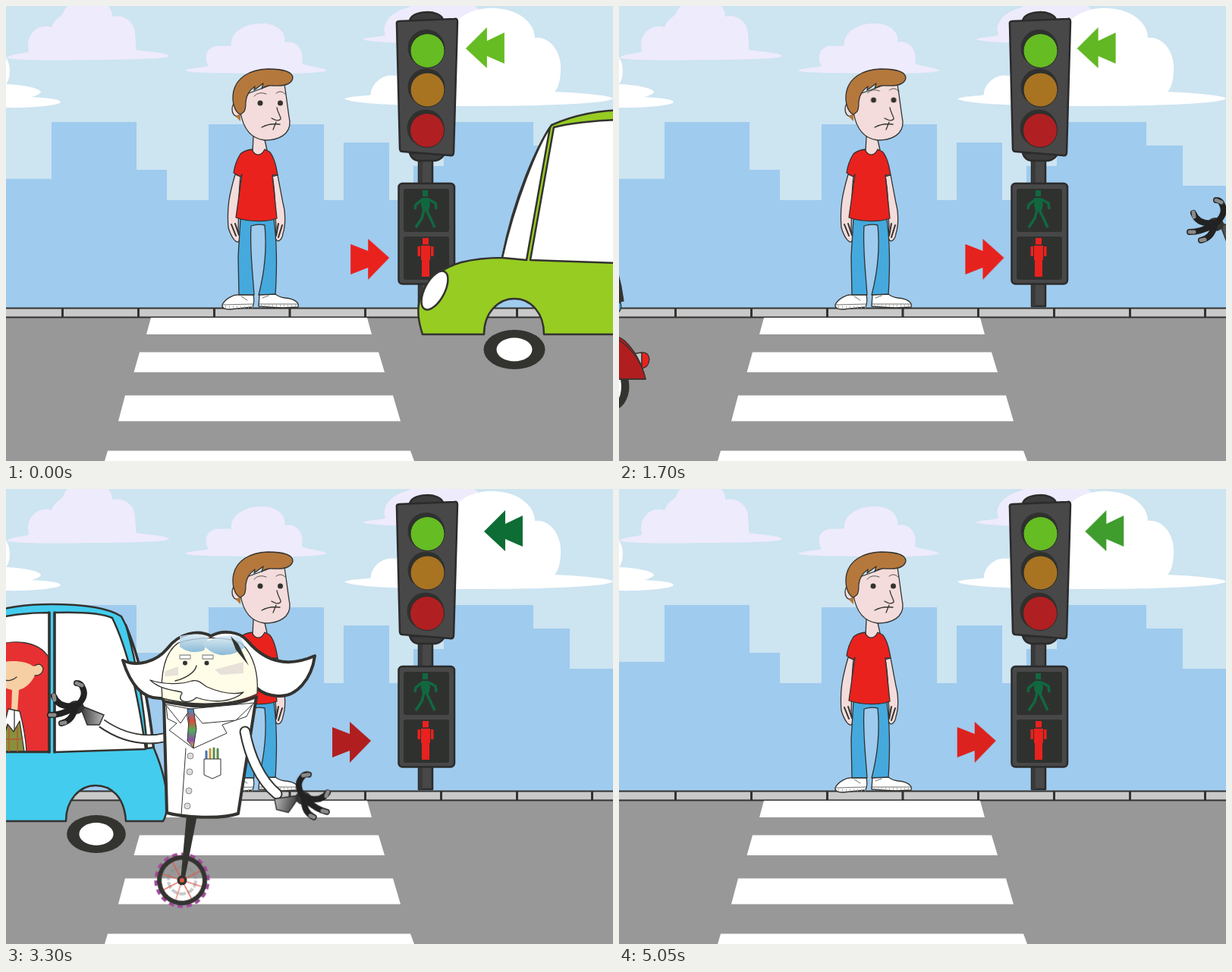
Animation of 800x600 px, one loop 5100 ms. Source, as an HTML page:

```html
<!DOCTYPE html>
<html lang="en">
<head>
<meta charset="utf-8">
<title>Waiting at the crossing</title>
<style>
html, body { margin: 0; width: 100%; height: 100%; overflow: hidden; background: #cde4f1; }
svg { display: block; width: 800px; height: 600px; }
.ink { stroke: #333330; stroke-width: 2.5; stroke-linejoin: round; }
.thin { stroke-width: 1.3; }
.bold { stroke-width: 4; }
.line { fill: none; stroke-linecap: round; }
.white { fill: #fff; }
.dark { fill: #333330; }
.skin { fill: #f3dcdb; }
.red { fill: #e9221e; }

/* --at: time in ms at which the part stands as drawn, --v: px per ms */
.pass { animation: pass 5100ms steps(102) infinite; }
@keyframes pass {
  from { transform: translateX(calc(var(--at) * var(--v) * 1px)); }
  to { transform: translateX(calc((var(--at) - 5100) * var(--v) * 1px)); }
}
.spin { animation: spin 5100ms steps(102) infinite; }
@keyframes spin { to { transform: rotate(-3728deg); } }

.eyes { animation: glance 5100ms linear infinite; }
@keyframes glance {
  0%, 23%, 60%, 100% { transform: none; }
  30%, 52% { transform: translate(.5px, -4px); }
}

.arrow { animation: nudge 5100ms linear infinite; }
@keyframes nudge {
  0% { transform: translateX(calc(var(--d) * 3.8px)); fill: var(--a); }
  15.84%, 32.9%, 49.2%, 59.5%, 72%, 87.1% { transform: translateX(0); fill: var(--a); }
  7.41%, 24.27%, 41.14%, 54.53%, 64.45%, 79.8%, 94.65% { transform: translateX(calc(var(--d) * 29px)); fill: var(--b); }
  100% { transform: translateX(calc(var(--d) * 8.6px)); fill: var(--m); }
}
</style>
</head>
<body>
<svg viewBox="0 0 800 600">
<defs>
  <linearGradient id="lens" x2="0" y2="1">
    <stop stop-color="#d5eaf6"/><stop offset="1" stop-color="#6fa9d4"/>
  </linearGradient>
  <linearGradient id="cuff"><stop stop-color="#333"/><stop offset="1" stop-color="#bbb"/></linearGradient>
  <linearGradient id="tie" x2="0" y2="1">
    <stop stop-color="#3a8fd0"/><stop offset=".3" stop-color="#e2483a"/>
    <stop offset=".55" stop-color="#4fae58"/><stop offset=".8" stop-color="#8c4fa8"/><stop offset="1" stop-color="#e0b53a"/>
  </linearGradient>
  <g id="wheel">
    <ellipse class="dark" rx="40.5" ry="26"/><ellipse class="white" rx="23.5" ry="15.5"/>
  </g>
  <g id="tall">
    <ellipse class="dark" rx="22.5" ry="31"/><ellipse class="white" rx="12" ry="23"/>
  </g>
  <g id="hand" class="line" stroke-width="8">
    <path d="M-34-17L-2-4-8 9-24 9Z" fill="url(#cuff)" stroke="#333" stroke-width="1.5"/>
    <ellipse class="dark" cx="-39" cy="-14" rx="11" ry="9"/>
    <path stroke="#222" d="M-38-16Q-24-28-30-40Q-32-46-38-46M-40-16Q-62-13-68-29M-42-13Q-58-4-73-4M-40-12Q-44 4-58 7"/>
    <path d="M-31-43L-38-46M-67-24L-68-30M-67-4L-73-4M-53 6L-58 7" stroke="#8a8a8a" stroke-width="5"/>
  </g>
  <g id="sedan">
    <path class="ink red" d="M-110 600C-75 555-35 505-12 478C5 467 20 464 40 462C100 457 160 456 200 457C280 458 350 462 385 468C415 482 455 550 478 600Z"/>
    <path class="ink white" d="M-12 484C-50 522-82 570-98 600H-72C-58 565-35 515-12 484Z
      M10 473C60 468 130 466 184 465L182 600H-58C-45 560-15 500 10 473Z
      M201 466C265 466 325 468 367 471C395 495 425 560 435 600H197Z
      M398 480C430 505 460 560 475 600H452C445 565 425 515 398 480Z"/>
    <path class="dark" d="M197 465H202L201 600H196ZM182 465H185L183 600H180Z"/>
  </g>
</defs>

<!-- town -->
<path fill="#cde4f1" d="M0 0H800V600H0Z"/>
<g fill="#eeebfc">
  <path d="M0 68C10 62 25 63 30 60C25 40 40 22 60 28C65 15 72 15 75 10C80-5 95-8 107-8C130-8 140 0 140 14C155 10 172 22 170 40C172 48 170 55 172 58C185 60 215 62 215 66C215 70 150 71 107 71C60 72 10 72 0 68Z"/>
  <path d="M236 85C240 82 262 81 267 79C258 65 268 50 284 53C290 52 294 53 297 52C295 35 315 22 338 23C358 23 370 36 367 48C382 44 394 58 390 76C400 80 422 82 422 85C420 88 380 90 330 89C280 89 240 88 236 85Z"/>
  <path d="M470 44C478 40 492 42 500 38C494 22 508 8 530 2C555-14 610-12 624 6L600 45 580 48C530 50 480 48 470 44Z"/>
</g>
<g class="white">
  <path d="M446 122C460 118 475 119 481 117C480 105 495 88 514 92C530 60 570 50 580 40C595 5 630 2 645 3C675 4 697 22 697 42C718 40 733 62 731 86Q730 106 723 113C750 114 800 118 800 122C795 128 720 132 623 132C540 132 455 130 446 122Z"/>
  <path d="M0 68C8 80 5 98 0 103C25 104 47 109 46 114Q42 118 33 120C55 121 72 123 72 127C70 131 30 135 0 134Z"/>
</g>
<path fill="#9fcbee" d="M0 228H60V153H172V216H212V256H267V156H419V256H445V180H505V256H537V211H577V153H695V184H743V237H800V398H0Z"/>
<path fill="#989898" d="M0 410H800V600H0Z"/>
<path fill="#c9c9c9" d="M0 398H800V410H0Z"/>
<path class="ink line" style="stroke-width:2" d="M0 398.500H800M0 410.500H800"/>
<path class="ink line" style="stroke-width:3;stroke-linecap:butt" d="M74.500 398V410M174.500 398V410M274.500 398V410M374 398V410M473.500 398V410M573.500 398V410M673.500 398V410M772.500 398V410"/>
<path class="white" d="M191 411H476L482 433H185ZM176 456.500H491L499 483H168.500ZM157 513.500H510L520 547.500H148ZM134 586.500H533L538 600H130Z"/>

<!-- traffic light -->
<g class="ink" style="stroke:#2b2b2b;stroke-width:2.5">
  <path fill="#484848" d="M544 200H562V396H544Z"/>
  <path fill="#3a3a3a" stroke="none" d="M544 200H549V396H544Z"/>
  <path fill="#3c3c3c" d="M532 194H578Q576 202 566 204H543Q535 203 532 194Z"/>
  <path fill="#3c3c3c" d="M532 20C533 5 573 4 576 18Z"/>
  <path fill="#484848" d="M518 20L591 17Q595 16 595 21L590 193Q590 198 585 197L523 192Q519 192 519 188L515 25Q514 20 518 20Z"/>
  <rect x="517.500" y="234" width="73.500" height="132.500" rx="5" fill="#484848"/>
  <g fill="#2f312f" stroke="none">
    <rect x="524" y="241" width="60" height="57" rx="3"/><rect x="524" y="304" width="60" height="57" rx="3"/>
    <circle cx="554" cy="55.500" r="24.500"/><circle cx="554" cy="107" r="24.500"/><circle cx="553" cy="161" r="24.500"/>
  </g>
  <g style="stroke-width:1">
    <circle cx="555.500" cy="59" r="22.500" fill="#66bc23"/>
    <circle cx="555.500" cy="110.500" r="22.500" fill="#a87422"/>
    <circle cx="555" cy="164" r="22.500" fill="#b02022"/>
  </g>
</g>
<g fill="#11683f">
  <path d="M549 243H556V251H549ZM548 253H557L559 262 557 270H549L547 262Z"/>
  <path fill="none" stroke="#11683f" stroke-width="3.500" d="M549 255L540 262 539 268M557 255L566 260 567 268M551 269L548 280 540 292M554 269L559 279 565 292"/>
</g>
<path class="red" d="M549 306H557V314.500H549ZM547 316H559V335H547ZM542.500 317H546V330H542.500ZM560 317H563.500V330H560ZM548 335H558V357H548Z"/>

<!-- waiting boy -->
<g class="ink thin">
  <path class="skin" d="M326 172L325 192Q334 204 344 190L340 172Z"/>
  <path class="skin" d="M302 222C294 250 291 265 293 292C297 306 303 312 306 311C310 310 307 302 306 294C307 270 306 250 309 225Z"/>
  <path class="skin" d="M351 225C356 250 354 275 356 290L355 306C358 314 364 308 365 300C369 288 368 270 365 260L358 223Z"/>
  <path class="line" d="M297 288L303 303M302 287L307 302M359 287L356 303M364 289L359 305" style="stroke-width:2"/>
  <path fill="#45a9de" d="M309 281L306 330 307 381H327C325 350 321 320 323 290Q332 287 341 289C344 320 341 350 333 381H355C357 350 357 310 353 281Z"/>
  <path class="red" d="M324 189C318 190 313 191 309 195C304 203 301 212 300 220L309 225 311 222 303 279C320 285 345 285 357 280L351 223 358 223C356 210 352 197 347 192L341 189C336 199 328 198 324 189Z"/>
  <path class="white" d="M307 381C300 380 289 386 285 394Q284 400 295 400L325 397Q328 390 326 381Z"/>
  <path class="white" d="M334 381L333 396Q360 399 385 397C387 391 380 386 368 385Q360 384 355 380Z"/>
  <path class="line" d="M286 394L326 393M333 393L385 393M310 383L318 388M338 385L346 382" style="stroke-width:.7"/>
  <path class="line" d="M289 397H325M336 395H383" stroke-dasharray="1 4" style="stroke-width:3;stroke:#aaa;stroke-linecap:butt"/>
  <ellipse class="skin" cx="304" cy="136" rx="6" ry="9.500"/>
  <path fill="#b8773a" d="M303 146L309 152 309 142Z" stroke="none"/>
  <path class="skin" d="M312 118L366 98C370 120 371 135 374 152C375 169 360 177 341 177C324 175 313 164 309 140Z"/>
  <path fill="#b5783c" d="M309 143C301 140 297 125 300 112C304 95 320 84 345 83C365 83 378 87 378 95C376 104 366 106 352 105Q343 104 337 109L339 102 327 111 328 106Q317 114 316 126Q316 138 313 140Z"/>
  <g class="eyes">
    <circle class="dark" cx="335" cy="128" r="3.500" stroke="none"/><circle class="dark" cx="361.500" cy="128" r="3.500" stroke="none"/>
    <path class="line" d="M327 119Q333 112 343 116M356 115Q362 110 368 116" style="stroke-width:.8"/>
  </g>
  <path class="line" d="M357 134C358 141 363 147 362 149Q359 153 350 148M337 160Q348 154 361 156M356 153L352 163"/>
</g>

<!-- pointing arrows -->
<path class="arrow" style="--d:1;--a:#66bc23;--b:#0a6a35;--m:#4ba82b" d="M602 56L630 28V46L653 35V76L630 66V82Z"/>
<path class="arrow" style="--d:-1;--a:#e9221e;--b:#ae1e20;--m:#e6231e" d="M509 332L481 307V323L458 314V354L481 345V361Z"/>

<!-- green car -->
<g class="pass" style="--at:0;--v:.87333">
  <g class="ink" fill="#97cc22">
    <path d="M549 433C543 415 541 400 546 385C552 362 575 345 600 338C620 333 640 332 654 332C670 250 700 185 719 157C750 143 785 137 820 137C860 138 895 145 908 157C930 200 945 270 951 335C962 365 972 400 970 415Q969 428 965 433H910C908 400 888 386 868 386C846 386 829 405 829 433H709C709 405 692 386 670 386C648 386 630 405 630 433Z"/>
    <path class="white" d="M654 332C670 260 700 185 717 160L686 335Z
      M722 160C740 155 775 151 806 150V339L691 335Z
      M814 149C850 149 880 152 890 154C905 180 922 270 932 336L814 339Z
      M907 163C926 205 942 270 950 334L938 332C932 280 920 210 907 163Z"/>
    <path class="line" d="M806 150V339M814 149V339" style="stroke-width:4"/>
    <ellipse class="white" cx="565" cy="375" rx="13" ry="28" transform="rotate(28 565 375)"/>
  </g>
  <use href="#wheel" x="670" y="453"/><use href="#wheel" x="868" y="453"/>
</g>

<!-- scooter -->
<g class="pass" style="--at:750;--v:.83158">
  <use href="#tall" x="595.500" y="502"/><use href="#tall" x="781" y="502"/>
  <g class="ink thin">
    <path class="dark" d="M727 412H779V437H730Z"/>
    <path fill="#c8c8c8" d="M806 459L820 457V477H812Z"/>
    <path class="red" d="M820 457Q829 456 830 466Q829 477 820 478Z"/>
    <g fill="#b01e20">
      <path d="M710 429C740 425 780 428 797 441C812 455 821 475 825 492H735C718 478 735 455 708 428Z"/>
      <path d="M720 492C714 460 722 432 750 430C790 428 818 460 825 492Z"/>
      <path d="M649 368L659 377C655 395 640 415 638 435C637 462 650 478 668 478H720L735 492H650C638 470 630 452 627 440C627 420 640 390 649 368Z"/>
      <path d="M551 481C555 460 575 440 603 441C625 445 640 465 645 491C630 482 605 470 585 471Q565 472 551 481Z"/>
    </g>
    <path fill="#45a9de" d="M792 391C795 400 790 408 775 410C750 412 722 413 712 416C704 430 707 455 706 474L680 473C682 450 674 420 674 400C690 393 720 394 750 393Z"/>
    <path class="line" d="M686 401C688 425 686 450 688 472"/>
    <path fill="#a5603f" d="M650 486Q651 474 682 473L706 474V486Z"/>
    <path class="skin" d="M723 332L715 360C695 355 676 347 664 341C655 334 643 335 637 343L640 353 655 349C675 358 695 370 708 374Q720 375 724 360L735 338Z"/>
    <path fill="#ccc" d="M618 339Q614 347 620 356L637 362 633 338Z"/>
    <path fill="#b01e20" d="M622 335L635 337 640 360 629 357Z"/>
    <path class="skin" d="M636 345Q645 332 660 338L666 346 648 353 640 357Z"/>
    <circle class="dark" cx="648" cy="354" r="8"/>
    <path fill="#b01e20" d="M653 358L666 352 662 371Z"/>
    <path class="skin" d="M652 246L648 262Q650 268 658 266L659 277 653 283 657 285 656 293C664 298 686 297 696 284L724 302 735 292 712 275 698 250Z"/>
    <path class="dark" d="M724 290C740 287 760 295 775 315C787 340 793 365 796 389C780 394 760 395 750 396C750 375 748 355 742 340L735 343 716 335C715 320 720 300 724 290Z"/>
    <path class="white" d="M652 219C670 214 692 220 698 238C701 252 698 266 690 267C678 268 670 266 664 256L652 247Z"/>
    <path fill="#22459d" d="M652 219C652 195 672 180 697 181C730 182 749 205 749 232C749 260 735 276 717 277C706 277 698 272 698 266L697 240C692 222 672 217 652 219Z"/>
    <path class="line" d="M654 283L662 282"/><circle class="dark" cx="657" cy="263" r=".6"/>
  </g>
</g>

<!-- blue car -->
<g class="pass" style="--at:2500;--v:.885">
  <g class="ink" fill="#43ccee">
    <path d="M518 438C511 425 510 405 516 390C524 366 546 353 572 348C595 345 606 346 616 346C630 270 650 205 683 165C710 154 740 152 768 152C810 152 842 156 860 168C883 210 897 280 903 342C915 370 922 400 920 420Q919 432 915 438H866C864 405 846 391 826 391C805 391 787 410 787 438H673C672 408 652 391 633 391C612 391 594 410 592 438Z"/>
    <path class="white" d="M618 344C634 275 652 210 678 172C662 230 650 290 642 346Z
      M684 173C710 166 740 163 765 163V347H646C654 280 668 215 684 173Z
      M772 163C805 162 835 164 848 170C870 215 884 285 892 343L772 347Z
      M866 179C884 225 896 285 902 341L894 342C890 285 880 230 866 179Z"/>
    <g class="thin">
      <path fill="#e73032" d="M674 346C672 300 676 225 690 210C712 196 752 200 764 222V346Z"/>
      <path fill="#f6cfa4" d="M694 232C708 224 735 226 744 234Q754 228 757 237Q755 247 746 246C740 258 732 263 725 265L723 294H715L716 265C700 262 692 250 694 232Z" stroke="none"/>
      <path class="line" d="M746 246Q756 246 757 237Q754 228 746 233M702 250Q712 256 722 248"/>
      <path class="white" d="M711 290L726 293C731 312 734 330 735 346H676C698 332 706 312 711 290Z"/>
      <path fill="#8a8f3c" d="M710 310L718 320 726 306 732 346H700Z"/>
      <path class="line" d="M704 330H730M712 314V346M723 314V346" style="stroke:#b05a35"/>
      <path class="line" d="M688 346C699 335 706 325 710 312M719 292V318"/>
    </g>
    <path class="line" d="M765 163V347M772 163V347" style="stroke-width:3.500"/>
    <ellipse class="white" cx="531" cy="380.500" rx="11.500" ry="26.500" transform="rotate(29 531 380.500)"/>
  </g>
  <use href="#wheel" transform="translate(633 455) scale(.96)"/><use href="#wheel" transform="translate(827 455) scale(.96)"/>
</g>

<!-- professor -->
<g class="pass" style="--at:2500;--v:.43375">
  <g transform="translate(579 516)" fill="none">
    <g class="spin">
      <circle r="34.500" stroke="#a3499b" stroke-width="4" stroke-dasharray="7 5.042"/>
      <circle r="30" stroke="#333330" stroke-width="6"/>
      <circle r="18" stroke="#888" stroke-width="4" stroke-dasharray="9 2.310" opacity=".45"/>
      <path stroke="#e0564a" stroke-width="1.200" d="M-27 0H27M0-27V27M-19-19L19 19M-19 19L19-19"/>
    </g>
  </g>
  <path class="dark" d="M585 430H599L582 517H577Z"/>
  <circle class="dark" cx="579" cy="516" r="6.500"/><circle cx="579" cy="516" r="3" fill="#e0564a"/>

  <path class="ink line" d="M560 327C530 334 500 328 473 309" style="stroke-width:13;stroke-linecap:butt"/>
  <path class="line" d="M560 327C530 334 500 328 472 308" stroke="#fff" stroke-width="9"/>
  <use href="#hand" x="478" y="302"/>

  <g class="ink bold white">
    <path d="M555 278C590 290 640 290 677 274L653 428C630 436 580 433 559 427Z"/>
    <g class="thin" style="stroke-width:1">
      <path d="M558 285L584 291 594 342 562 318 572 309 560 303Z"/>
      <path d="M672 284L594 291 594 342 638 322 632 311 664 300Z"/>
      <path d="M557 284L590 290 577 309ZM590 290L674 282 650 305 606 309Z"/>
      <path d="M586 290H594L598 316 594 341 586 332 588 305Z" fill="url(#tie)"/>
      <path class="line" d="M584 342L578 430"/>
      <g fill="#ddd" style="stroke:#888"><circle cx="590" cy="352" r="4"/><circle cx="589" cy="373" r="4"/><circle cx="588" cy="398" r="4"/><circle cx="586" cy="418" r="4"/></g>
      <g class="line" style="stroke-width:3">
        <path stroke="#4b6fae" d="M611 357V346"/><path stroke="#c09a3c" d="M616 357V343"/>
        <path stroke="#5b8a4c" d="M621 357V342M626 357V343"/>
      </g>
      <path d="M608 356H630V377L619 382 608 377Z"/>
    </g>
  </g>
  <path class="ink line" d="M662 320C668 352 682 384 704 402" style="stroke-width:15"/>
  <path class="line" d="M662 320C668 352 682 384 704 402" stroke="#fff" stroke-width="11"/>
  <use href="#hand" transform="translate(698 412) scale(-1 1) rotate(-14)"/>

  <g class="ink">
    <path class="white bold" d="M501 226C520 235 545 228 560 210C575 190 600 185 617 194C632 185 655 188 665 200C690 230 720 235 754 220C750 250 730 275 705 273C690 272 682 267 677 262C672 282 600 290 555 280L553 276C525 278 510 255 501 226Z"/>
    <path class="thin" fill="#fffde8" d="M553 276C550 245 556 215 574 203C600 194 640 194 658 204C674 220 680 245 678 270C650 284 600 288 553 276Z"/>
    <path fill="#d8cfd0" opacity=".6" stroke="none" d="M622 238L660 228V243L630 245ZM557 240L574 234V246L556 247Z"/>
    <g fill="url(#lens)" opacity=".8" stroke="none">
      <path d="M576 194Q600 188 614 196L608 213Q590 219 576 208Z"/>
      <path d="M606 204Q630 190 655 194L662 208Q650 220 630 219Q614 216 606 204Z"/>
    </g>
    <path class="dark" d="M643 194L653 204 667 233 650 212Z" stroke="none"/>
    <path class="white thin" d="M576 219H590V224H576ZM606 219H620V224H606Z" style="stroke:#999"/>
    <circle class="dark" cx="583" cy="229.500" r="3" stroke="none"/><circle class="dark" cx="611.500" cy="229.500" r="3" stroke="none"/>
    <path class="white thin" d="M537 252C555 258 578 258 592 253C602 251 606 258 612 261C628 268 645 272 660 268C645 281 622 283 598 275C588 284 572 281 578 271C585 264 556 270 537 252Z"/>
    <path class="line thin" d="M598 233C596 243 582 250 570 253"/>
  </g>
</g>

<!-- near lane -->
<use href="#sedan" class="pass" style="--at:1320;--v:1.65"/>
<use href="#sedan" class="pass" style="--at:4100;--v:1.65"/>
</svg>
</body>
</html>
```
